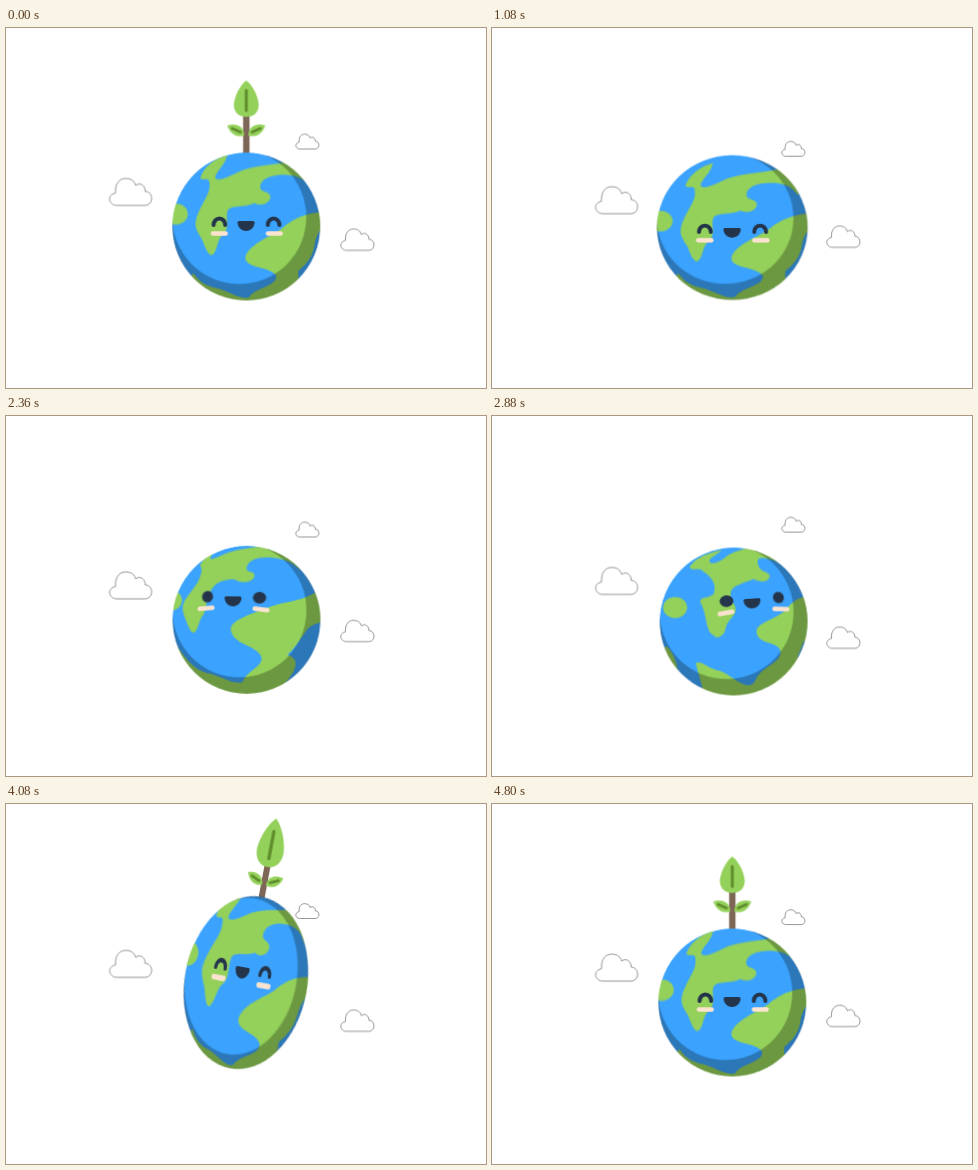
Write an HTML page without scripts that moves like this. It is 480 px wide and 360 px high and loops after 4.84 s.

```html
<!DOCTYPE html>
<html lang="en">
<head>
<meta charset="utf-8">
<title>Happy planet</title>
<style>
html, body { margin: 0; width: 100%; height: 100%; overflow: hidden; background: #fff; }
svg { display: block; width: 100%; height: 100%; }

.hop, .squash, .plant, .bud, .shade, .drift, .land, .isle, .cove, .face, .cheek, .eye, .mood {
  animation: 4840ms ease-in-out infinite;
}
.green { fill: #94d15a; }
.ink { fill: #24344b; }
.line { fill: none; stroke: #24344b; stroke-width: 4; stroke-linecap: round; }
.rib { fill: none; stroke: #5f8c2c; stroke-width: 3; stroke-linecap: round; }
.cloud { fill: #fff; stroke: #50505a; stroke-width: .6; }

/* Clouds */
.bob { animation: bob 2420ms cubic-bezier(.37, 0, .63, 1) infinite alternate; }
.bob.left { --rise: 6.7px; animation-delay: -920ms; }
.bob.small { --rise: 7.6px; animation-delay: -1240ms; }
@keyframes bob {
  from { transform: translateY(calc(-1 * var(--rise))); }
  to { transform: translateY(var(--rise)); }
}
.sway { animation: sway 4840ms linear infinite; }
@keyframes sway {
  0%, 100% { transform: translateY(0); }
  22.3% { transform: translateY(-3px); }
  29.8% { transform: translateY(-4.5px); }
  37.2% { transform: translateY(-4px); }
  48.3% { transform: translateY(3px); }
  59.5% { transform: translateY(10px); }
  67.4% { transform: translateY(11.5px); }
  75.2% { transform: translateY(10px); }
  84.3% { transform: translateY(5px); }
}

/* Body */
.hop { animation-name: hop; }
@keyframes hop {
  0%, 12.4%, 24%, 70.2%, 95.9%, 100% { transform: translate(0, 0) rotate(0deg); }
  14.9% { transform: translate(0, 23px) rotate(0deg); }
  17.8% { transform: translate(0, -24px) rotate(-8deg); }
  20.7% { transform: translate(0, 14px) rotate(0deg); }
  22.3% { transform: translate(0, 1px) rotate(0deg); }
  33%, 46.3% { transform: translate(0, 5px) rotate(0deg); }
  55.8%, 64% { transform: translate(1.3px, 7px) rotate(0deg); }
  75.2% { transform: translate(0, .3px) rotate(0deg); }
  79.3% { transform: translate(0, 36px) rotate(0deg); }
  84.3% { transform: translate(-.4px, -20px) rotate(10.5deg); }
  88.4% { transform: translate(0, 26px) rotate(0deg); }
  90.9% { transform: translate(0, -3px) rotate(0deg); }
  93.4% { transform: translate(0, 2px) rotate(0deg); }
}
.squash { animation-name: squash; }
@keyframes squash {
  0%, 12.4%, 24%, 70.2%, 95.9%, 100% { transform: scale(1, 1); }
  14.9% { transform: scale(1.12, .86); }
  17.8% { transform: scale(.83, 1.18); }
  20.7% { transform: scale(1.1, .88); }
  22.3% { transform: scale(1.02, .98); }
  75.2% { transform: scale(1.03, .97); }
  79.3% { transform: scale(1.15, .8); }
  84.3% { transform: scale(.83, 1.18); }
  88.4% { transform: scale(1.11, .86); }
  90.9% { transform: scale(.97, 1.03); }
  93.4% { transform: scale(1.01, .99); }
}
.plant { animation-name: plant; }
@keyframes plant {
  0%, 12.4%, 95.9%, 100% { transform: translateY(-74px) scale(1); }
  14.9% { transform: translateY(-63.6px) scale(1); }
  17.8%, 84.3% { transform: translateY(-82px) scale(.95, 1); }
  20.2%, 81% { transform: translateY(-60px) scale(0); }
  88.4% { transform: translateY(-63.6px) scale(1); }
  90.9% { transform: translateY(-76px) scale(1); }
  93.4% { transform: translateY(-73px) scale(1); }
}
.bud { transform-origin: 0 -35.5px; animation-name: bud; }
@keyframes bud {
  0%, 14.9%, 88.4%, 100% { transform: scale(1); }
  17.8%, 84.3% { transform: scale(1.14, 1.35); }
}
.shade { animation-name: shade; }
@keyframes shade {
  0%, 14.9%, 20.7%, 79.3%, 88.4%, 100% { transform: translateY(0); }
  17.8%, 84.3% { transform: translateY(5px); }
}

/* Surface */
.drift { animation-name: drift; }
@keyframes drift {
  0%, 14.9%, 30%, 79.3%, 90.9%, 100% { transform: translate(0, 0); }
  17.8% { transform: translate(0, -3px); }
  22.3% { transform: translate(0, 6px); }
  84.3% { transform: translate(-4px, -3px); }
}
.north { animation-name: north; }
@keyframes north {
  0%, 24%, 70.2%, 100% { d: path("M221,127 C208,130 197,140 194,150 C196,153 203,149 203,154 C205,165 197,172 192,185 C186,199 191,203 196,212 C199,220 202,228 206,227 C212,222 210,212 217,206 C224,200 219,190 221,184 C222,176 240,180 248,175 C253,178 262,177 264,170 C265,163 255,165 254,160 C253,150 268,146 281,147 C293,148 300,152 304,160 L310,140 L285,133 C270,137 245,137 230,145 C220,150 208,155 209,148 C213,140 219,136 221,127Z"); }
  33%, 46.3% { d: path("M207,131 C201,134 197,138 194,143 C194,147 195,145 195,150 C193,160 190,163 181,175 C175,183 175,188 179,198 C182,206 185,213 188,211 C192,208 192,201 195,196 C200,191 199,181 203,172 C208,160 218,158 228,158 C236,163 246,161 248,155 C249,149 240,152 240,147 C241,139 250,136 262,136 C277,137 285,140 293,148 L310,135 L285,120 C262,125 235,126 220,132 C210,136 203,140 204,136 C205,134 206,133 207,131Z"); }
  55.8%, 64% { d: path("M228,127 C210,131 201,136 196,144 C198,149 206,144 209,148 C220,155 223,163 220,171 C215,176 205,173 207,180 C213,190 212,206 218,211 C224,217 231,213 232,205 C234,196 243,193 242,185 C240,178 236,178 237,172 C236,163 248,161 260,156 C265,159 274,160 276,154 C277,148 267,150 265,143 C262,135 266,134 275,136 C288,139 294,145 301,155 L308,133 L283,118 C255,124 240,128 232,134 C226,140 214,143 216,137 C220,132 225,131 228,127Z"); }
}
.south { animation-name: south; }
@keyframes south {
  0%, 24%, 70.2%, 100% { d: path("M318,184 C295,185 283,194 275,201 C265,208 241,217 239,230 C240,241 264,238 270,248 C271,258 248,260 243,269 C236,273 220,262 210,260 C200,258 193,254 187,245 L170,275 L240,290 L292,260 C292,255 292,248 292,243 C300,236 306,230 308,218 C309,210 312,204 318,196Z"); }
  33%, 46.3% { d: path("M318,163 C300,181 280,179 262,184 C245,190 216,198 218,209 C222,225 247,225 250,238 C250,247 236,250 232,261 C222,263 210,254 195,252 C183,247 177,241 166,223 L150,270 L240,295 L262,275 C284,257 297,239 277,234 C285,227 290,219 298,208 C302,202 308,199 318,198Z"); }
  55.8%, 64% { d: path("M317,173 C303,174 299,179 291,188 C281,197 261,200 263,210 C265,222 286,218 287,229 C287,241 267,243 261,259 C253,269 239,253 227,248 C215,246 208,237 202,240 L211,273 L239,293 L299,263 C302,248 303,238 305,231 C307,227 308,223 310,219 C312,217 314,217 317,215Z"); }
}
.isle { animation-name: isle; }
@keyframes isle {
  0%, 24%, 70.2%, 100% { transform: translate(0, 0); }
  33%, 46.3% { transform: translate(-9px, -8px); }
  55.8%, 64% { transform: translate(12px, -1.5px); }
}
.cove { animation-name: cove; }
@keyframes cove {
  0%, 46.3%, 70.2%, 100% { transform: translateX(-25px); }
  55.8%, 64% { transform: translateX(0); }
}

/* Face */
.face { transform-origin: 240px 196px; animation-name: face; }
@keyframes face {
  0%, 24%, 70.2%, 79.3%, 90.9%, 100% { transform: translate(0, 0) rotate(0deg); }
  33%, 46.3% { transform: translate(-18.5px, -18px) rotate(2deg); }
  55.8%, 64% { transform: translate(18.7px, -17.5px) rotate(-4deg); }
  84.3% { transform: translate(-2.5px, -4px) rotate(0deg); }
}
.cheek, .eye { transform-box: fill-box; transform-origin: center; }
.cheek { fill: #fce3d0; animation-name: tilt; }
@keyframes tilt {
  0%, 24%, 70.2%, 100% { transform: rotate(0deg); }
  33%, 64% { transform: rotate(var(--tilt)); }
}
.eye.l { animation-name: eye-left; }
.eye.r { animation-name: eye-right; }
@keyframes eye-left {
  0%, 46.3% { transform: rotate(25deg) scale(.76, 1); }
  55.8%, 100% { transform: rotate(0deg) scale(1); }
}
@keyframes eye-right {
  0%, 46.3% { transform: rotate(0deg) scale(1); }
  55.8%, 100% { transform: rotate(-25deg) scale(.78, 1); }
}
.mood { animation-timing-function: step-end; }
.happy { animation-name: happy; }
.curious { animation-name: curious; }
.smile { animation-name: smile; }
.angry { animation-name: angry; }
@keyframes happy { 0%, 82%, 100% { opacity: 1; } 28% { opacity: 0; } }
@keyframes curious { 0%, 67%, 100% { opacity: 0; } 28% { opacity: 1; } }
@keyframes smile { 0%, 82%, 100% { opacity: 1; } 67% { opacity: 0; } }
@keyframes angry { 0%, 82%, 100% { opacity: 0; } 67% { opacity: 1; } }
</style>
</head>
<body>
<svg viewBox="0 0 480 360">
  <defs>
    <path id="cloud" vector-effect="non-scaling-stroke" d="M8,27 C1,27 -3,17 7,14.5 C6,4 12,0 17,0 C23,0 26,3 27,7 C32,3 37,8 36.5,13 C45,13 45.5,27 36,27Z"/>
    <g id="leaf">
      <path class="green" d="M-2,-17 C-10,-14 -17,-20 -19,-27 C-10,-30 -2,-26 -2,-17Z"/>
      <path class="rib" stroke-width="2" d="M-14,-24 L-6,-20.5"/>
    </g>
    <clipPath id="disc"><circle r="74"/></clipPath>
  </defs>

  <g class="cloud">
    <g transform="translate(102.6 152.9)"><use class="bob left" href="#cloud"/></g>
    <g transform="translate(289.2 105.8)"><g class="bob small"><use href="#cloud" transform="scale(.55)"/></g></g>
    <g transform="translate(334 201)"><g class="sway"><use href="#cloud" transform="scale(.79)"/></g></g>
  </g>

  <g transform="translate(240.3 198.5)">
    <g class="hop">
      <g class="plant">
        <path fill="#7d6656" d="M-3.2,-38 H3.2 V10 H-3.2Z"/>
        <use href="#leaf"/>
        <use href="#leaf" transform="scale(-1 1)"/>
        <g class="bud">
          <path class="green" d="M0,-72 C6.5,-67 11.5,-57 12.5,-48 C12.5,-39 6,-35.5 0,-35.5 C-6,-35.5 -12.5,-39 -12.5,-48 C-11.5,-57 -6.5,-67 0,-72Z"/>
          <path class="rib" d="M0,-62 V-42"/>
        </g>
      </g>

      <g class="squash">
        <g clip-path="url(#disc)">
          <circle r="74" fill="#3ba3fd"/>
          <g class="green" transform="translate(-240 -198.5)">
            <path class="land south"/>
            <g class="drift">
              <path class="land north"/>
              <ellipse class="isle" cx="169.5" cy="186" rx="12" ry="10.6"/>
              <path class="cove" d="M173,223 C181,231 184,243 185,253 L150,245Z"/>
            </g>
          </g>
          <path class="shade" fill-opacity=".27" fill-rule="evenodd" d="M-90,-90 H90 V90 H-90Z M-74,-9.5 a67,67 0 1 0 134,0 a67,67 0 1 0 -134,0Z"/>
        </g>

        <g transform="translate(-240 -198.5)">
          <g class="drift">
            <g class="face">
              <rect class="cheek" style="--tilt:-6deg" x="204.5" y="203.2" width="17" height="4.6" rx="2"/>
              <rect class="cheek" style="--tilt:6deg" x="259.5" y="203.2" width="17" height="4.6" rx="2"/>
              <g class="mood happy line">
                <path d="M207.3,197 a5.8,6.5 0 0 1 11.6,0"/>
                <path d="M261.5,197 a5.8,6.5 0 0 1 11.6,0"/>
              </g>
              <g class="mood curious ink">
                <ellipse class="eye l" cx="214.3" cy="193.8" rx="6.9" ry="5.9"/>
                <ellipse class="eye r" cx="266.3" cy="193.8" rx="6.9" ry="5.9"/>
              </g>
              <path class="mood smile ink" d="M233,193 H246.5 Q248.5,193 248.3,195 C247,205.5 232.5,205.5 231.3,195 Q231,193 233,193Z"/>
              <g class="mood angry line">
                <path d="M205,190 L221,197 M276,190 L260,197"/>
                <path d="M232.5,203 C235,193.5 245,193.5 247.5,203"/>
              </g>
            </g>
          </g>
        </g>
      </g>
    </g>
  </g>
</svg>
</body>
</html>
```
